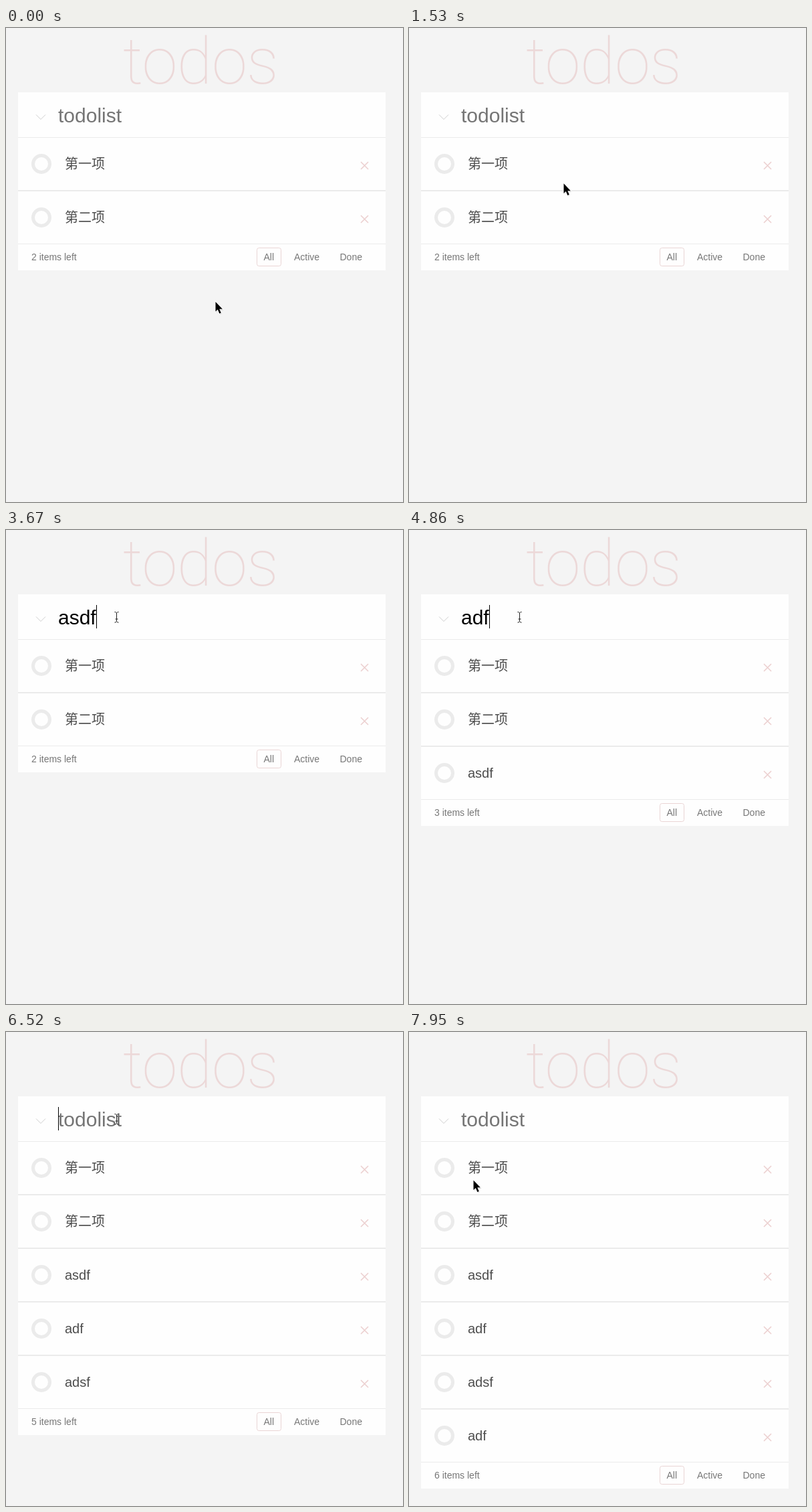
Recreate the animation shown at these times as an HTML page. Size 594x708 px, loop 8000 ms.

```html
<!DOCTYPE html>
<html lang="zh-CN">
<head>
<meta charset="utf-8">
<title>todos</title>
<style>
  html, body { margin: 0; width: 100%; height: 100%; overflow: hidden; background: #f4f4f4; }
  svg { display: block; }
  text { font-family: "Liberation Sans", "Noto Sans CJK SC", "Noto Sans CJK", sans-serif; }
  .title { font: 100 96px Roboto, Inter, sans-serif; fill: #ecd8d8; text-anchor: middle; }
  .field { font-size: 30px; }
  .item { font-size: 20px; fill: #4d4d4d; }
  .footer text { font-size: 14px; fill: #777; }
  .card { fill: #fefefe; }
  .rule { fill: #ebebeb; }
  .line { fill: none; }
</style>
</head>
<body>
<svg width="594" height="708" viewBox="0 0 594 708">
  <text class="title" x="190 230 282 334.5 384" y="83">todos</text>
  <rect class="card" id="card" x="18" y="96" width="550"/>
  <path class="line" d="M45 129.5l7 7 7-7" stroke="#cfcfcf"/>
  <text class="field" id="field" x="78" y="141"></text>
  <rect id="caret" y="112" width="1" height="35"/>
  <rect class="rule" x="18" y="163" width="550" height="1"/>
  <g id="rows"></g>
  <g class="footer" id="footer">
    <rect class="rule" x="18" width="550" height="1"/>
    <text id="count" x="38" y="25"></text>
    <rect class="line" x="375.5" y="6.5" width="36" height="27" rx="3" stroke="#ead5d5"/>
    <text x="385.5" y="25">All</text>
    <text x="431" y="25">Active</text>
    <text x="499.5" y="25">Done</text>
  </g>
  <g id="arrow">
    <path d="M1 1.5V16l3.3-3 2.4 6 2.6-1-2.5-5.6H12z" fill="#000" opacity=".15"/>
    <path d="M0 0V14.6l3.3-3 2.5 6 2.5-1.1-2.5-5.7H10.4z" stroke="#fff" stroke-width="1.6" paint-order="stroke"/>
  </g>
  <g id="beam" class="line">
    <path id="beamShape" d="M162.5 122.5h1.5l1.5 1.5 1.5-1.5h1.5M165.5 124v12.5M162.5 138h1.5l1.5-1.5 1.5 1.5h1.5M163.5 133h4" stroke="#222"/>
  </g>
</svg>
<script>
const LOOP = 8000, ROW = 80;
const names = ['第一项', '第二项', 'asdf', 'adf', 'adsf', 'adf'];

// time, typed text, caret shown, number of items
const states = [
  [0, '', false, 2],
  [2600, '', true, 2],
  [3070, '', false, 2],
  [3550, 'as', true, 2],
  [3670, 'asdf', true, 2],
  [4260, '', true, 3],
  [4380, 'a', true, 3],
  [4740, 'ad', true, 3],
  [4860, 'adf', true, 3],
  [4970, '', true, 4],
  [5210, 'ads', true, 4],
  [5320, 'adsf', true, 4],
  [5440, '', true, 5],
  [6040, '', false, 5],
  [6520, '', true, 5],
  [6880, 'adf', true, 5],
  [7240, '', true, 6],
  [7720, '', false, 6]
];

// first step, last step, step count, end point
const moves = [
  [480, 1190, 7, 254.5, 269.5],
  [1300, 2000, 7, 174, 139.5],
  [2120, 2120, 1, 173.5, 134.5],
  [7830, 7830, 1, 105, 199],
  [7950, 7950, 1, 96.5, 221.5]
];

const $ = id => document.getElementById(id);
const show = (el, on) => { el.style.display = on ? '' : 'none'; };

$('rows').innerHTML = names.map((name, i) => `<g transform="translate(0 ${203 + ROW * i})">
  ${i ? '<rect class="rule" x="18" y="-41" width="550" height="2"/>' : ''}
  <circle class="line" cx="53" r="12.5" stroke="#ebebeb" stroke-width="5"/>
  <text class="item" x="88" y="7">${name}</text>
  <path class="line" d="M531 -3l11 11m0 -11l-11 11" stroke="#ecd0d0" stroke-width="1.6"/>
</g>`).join('');
const rows = [...$('rows').children];

function pointerAt(t) {
  let x = 313.5, y = 409;
  for (const [from, to, count, endX, endY] of moves) {
    if (t < from) break;
    const gap = (to - from) / (count - 1) || 1;
    const k = Math.min(count, Math.floor((t - from) / gap + 1e-6) + 1) / count;
    x += (endX - x) * k;
    y += (endY - y) * k;
  }
  return [x, y];
}

function drawList([, typed, caretOn, total]) {
  const field = $('field');
  field.textContent = typed || 'todolist';
  field.setAttribute('fill', typed ? '#000' : '#757575');
  show($('caret'), caretOn);
  $('caret').setAttribute('x', typed ? Math.round(78 + field.getComputedTextLength()) : 78);

  rows.forEach((row, i) => show(row, i < total));
  const bottom = 162 + ROW * total;
  $('footer').setAttribute('transform', `translate(0 ${bottom})`);
  $('card').setAttribute('height', bottom + 40 - 96);
  $('count').textContent = `${total} items left`;
}

let current;
const start = performance.now();
function frame() {
  const t = (performance.now() - start) % LOOP;
  const state = states.findLast(s => s[0] <= t);
  if (state !== current) drawList(current = state);

  const overField = t >= 2360 && t < 7830;
  show($('beam'), overField);
  show($('arrow'), !overField);
  $('arrow').setAttribute('transform', `translate(${pointerAt(t)})`);
  requestAnimationFrame(frame);
}
frame();
</script>
</body>
</html>
```
